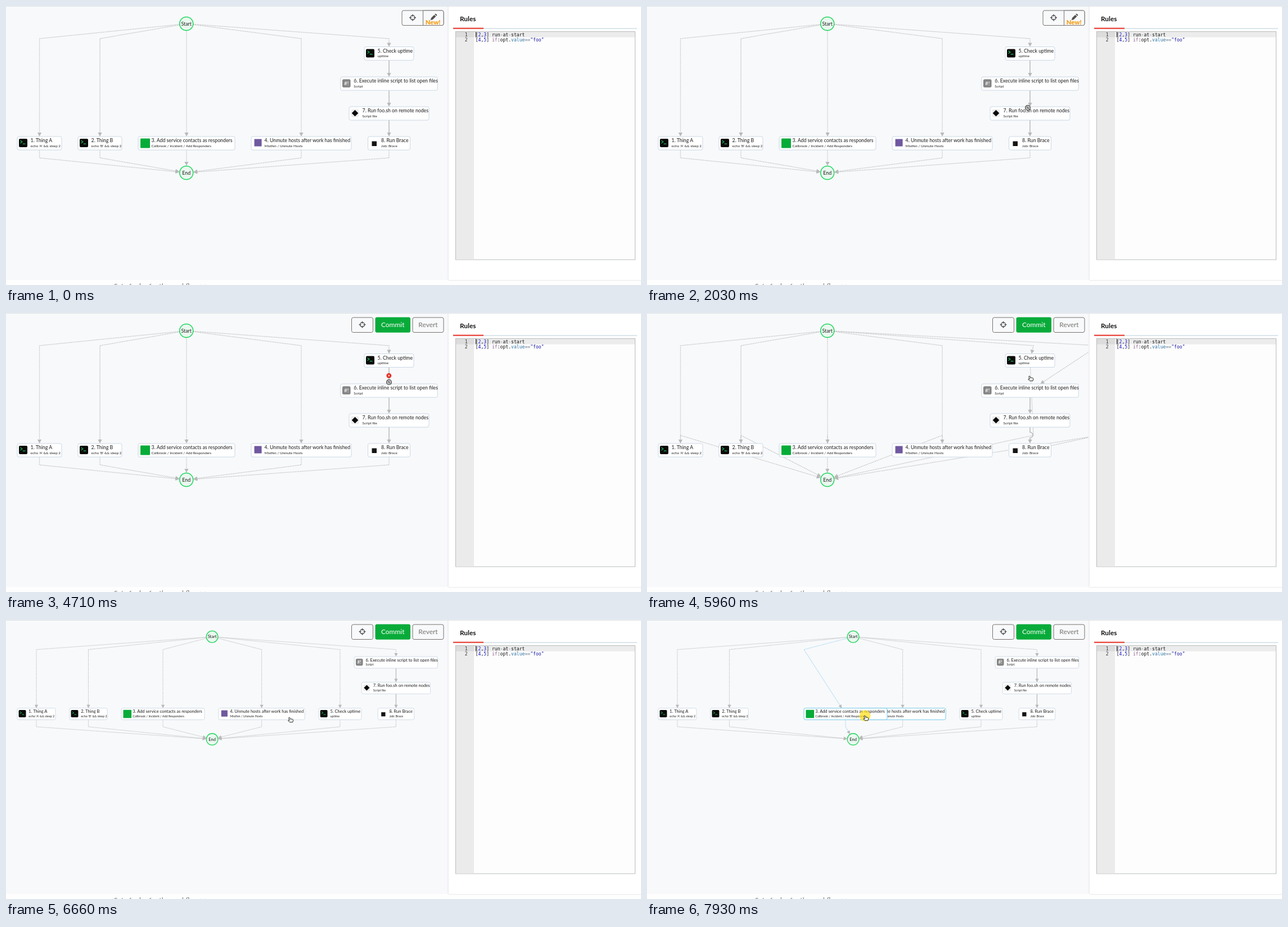
Animation, 1129 px wide and 496 px high, one loop 8000 ms. Source, as an HTML page:

```html
<!DOCTYPE html>
<html lang="en">
<head>
<meta charset="utf-8">
<title>Workflow graph</title>
<style>
html, body { margin: 0; width: 100%; height: 100%; overflow: hidden; background: #fefefe; }
svg { display: block; width: 1129px; height: 496px; font-family: Lato, "Open Sans", sans-serif; }
text { white-space: pre; }
.code { font: 8.1px "DejaVu Sans Mono", monospace; }
.title { font-size: 8.75px; fill: #1c1c1c; }
.sub { font-size: 6.35px; fill: #222; }
.node rect.box { fill: #fff; stroke: #cbd8e4; }
.node.on rect.box { stroke: #5fc3e6; }
.btn { fill: #f8f9fb; stroke: #77736f; }
.hot .btn { fill: #5f5b57; }
.ring { fill: #eaf8ef; stroke: #1fd65f; stroke-width: 1.5; }
</style>
</head>
<body>
<svg id="stage" viewBox="0 0 1129 496">
  <rect width="787" height="487" fill="#f8f9fb"/>
  <text x="192" y="502" font-size="12" fill="#777">Set of rules for the workflow &gt;&gt;</text>
  <g id="graph"><g id="edges"></g><g id="nodes"></g></g>
  <g id="remove"><circle cx="680.8" cy="111.3" r="4.4" fill="#e32b20"/><path d="M679.2 109.7l3.2 3.2m0-3.2l-3.2 3.2" stroke="#fff"/></g>

  <g id="viewBar">
    <rect class="btn" x="704" y="8" width="74" height="26.5" rx="3" style="fill:#f8f9fb"/>
    <use href="#aim" x="723" y="20.7"/>
    <g id="edit">
      <path class="btn" d="M741.5 8h33.5q3 0 3 3v20.5q0 3-3 3h-33.5z"/>
      <path id="pen" d="M-2.1-5.6v-1.2q0-1 1-1h2.2q1 0 1 1v1.2zm0 1.1h4.2v7.6l-2.1 4-2.1-4z" transform="translate(759.7 20.3) rotate(45)"/>
    </g>
    <text x="745.7" y="33" font-size="11.2" font-weight="900" fill="#f6a01e">New!</text>
  </g>
  <g id="editBar" font-size="12">
    <rect class="btn" x="614.5" y="8" width="38" height="26.5" rx="3"/>
    <use href="#aim" x="633.5" y="20.7"/>
    <rect x="656.5" y="7.5" width="62.5" height="27.3" rx="3" fill="#08ab3a"/>
    <text x="687.7" y="25.2" text-anchor="middle" fill="#fff">Commit</text>
    <g id="revert">
      <rect class="btn" x="723" y="8" width="55" height="26.5" rx="3"/>
      <text id="revertText" x="750.5" y="25.2" text-anchor="middle">Revert</text>
    </g>
  </g>

  <rect x="784.5" width="1.2" height="487" fill="#f3f4f6"/>
  <rect x="785.7" width="1.3" height="487" fill="#eceef0"/>
  <rect x="787" width="342" height="487" fill="#fff"/>
  <rect x="787" y="487" width="342" height="1.5" fill="#efefef"/>
  <rect width="1129" height="1" fill="#dfe2e4"/>
  <text x="807" y="27.3" font-size="11.8" font-weight="700" fill="#111">Rules</text>
  <rect x="849" y="39.3" width="273" height="1.6" fill="#d2e0e8"/>
  <rect x="795" y="38.6" width="54" height="2.3" fill="#e8463c"/>
  <rect x="799.5" y="45.5" width="319" height="405.5" fill="#fdfdfd" stroke="#b9bbbb"/>
  <rect x="800" y="46" width="32" height="404.5" fill="#ebebeb"/>
  <rect x="800" y="46" width="32" height="9.6" fill="#dcdcdc"/>
  <rect x="832" y="46" width="286" height="9.6" fill="#ececec"/>
  <rect x="834.9" y="46" width="1" height="9.6" fill="#333"/>
  <g class="code" fill="#111">
    <text x="820.5" y="53.6" text-anchor="end" fill="#333">1</text>
    <text x="820.5" y="63.4" text-anchor="end" fill="#333">2</text>
    <text x="834.7" y="53.6">[<tspan fill="#1414cd">2</tspan>,<tspan fill="#1414cd">3</tspan>] run<tspan fill="#687687">-</tspan>at<tspan fill="#687687">-</tspan>start</text>
    <text x="834.7" y="63.4">[<tspan fill="#1414cd">4</tspan>,<tspan fill="#1414cd">5</tspan>] <tspan fill="#93618f">if</tspan>:opt.<tspan fill="#2f76a8">value</tspan><tspan fill="#687687">==</tspan><tspan fill="#1a1aa6">"foo"</tspan></text>
  </g>

  <circle id="press" r="10" fill="#ffdf1a" opacity=".72"/>
  <g id="grab"><circle r="4.4" fill="#f2f2f2" stroke="#3d3d3d" stroke-width="1.3"/><circle r="2" fill="none" stroke="#555"/><path d="M-2.6-2.6L2.6 2.6" stroke="#444"/></g>
  <path id="hand" d="M-1.3.9Q-.2-1 1 .8L1.8 3.2Q4.4 2.6 6.2 3.7Q7.2 4.4 6.7 6L6 8.7H.8L-2 6.3Q-2.6 5 -1.2 5.1L.3 5.5Z" fill="#f4f4f4" stroke="#2c2c2c" stroke-linejoin="round"/>
  <defs><g id="aim" fill="none" stroke="#484848" stroke-width="1.2"><circle r="4"/><path d="M0-6v4M0 6v-4M-6 0h4M6 0h-4"/></g></defs>
</svg>
<script>
const $ = id => document.getElementById(id);
const LOOP = 8000, CUT = 5880, MOVE = 6110, ZOOM = .8605, H = 24;

const icons = {
  term: '<rect x="-7.5" y="-7.5" width="15" height="15" rx="2" fill="#0a0a0a"/><path d="M-5-4.3l3.4 2.4L-5 .5M-.8 1.6h4.6" fill="none" stroke="#1fc35a" stroke-width="1.1"/>',
  hash: '<rect x="-7.3" y="-7.3" width="14.6" height="14.6" rx="2.5" fill="#858585"/><text y="3.6" font-size="10" text-anchor="middle" fill="#fff">#!</text>',
  file: '<rect x="-7" y="-7" width="14" height="14" rx="3" fill="#ececec"/><path d="M0-5.8L5.8 0 0 5.8-5.8 0z" fill="#080808"/>',
  green: '<rect x="-6.5" y="-8" width="17" height="17" rx="1" fill="#06ac38"/>',
  purple: '<rect x="-5" y="-7" width="13" height="13" fill="#6f589f"/>',
  dark: '<rect x="-3.5" y="-3" width="8.5" height="8.5" fill="#141414"/>'
};

// width, first place, second place, icon, title, subtitle
const nodes = {
  1: [79, 59.5, 244, 59.5, 191, 'term', '1. Thing A', "echo 'A' && sleep 2"],
  2: [78, 167, 244, 167, 191, 'term', '2. Thing B', "echo 'B' && sleep 2"],
  3: [172, 321, 244, 321, 191, 'green', '3. Add service contacts as responders', 'Callbrook / Incident / Add Responders'],
  4: [178, 525, 244, 525, 191, 'purple', '4. Unmute hosts after work has finished', 'Mistfen / Unmute Hosts'],
  5: [88, 681, 84.5, 687, 191, 'term', '5. Check uptime', 'uptime'],
  6: [172.5, 681, 138, 802.6, 84.5, 'hash', '6. Execute inline script to list open files', 'Script'],
  7: [142, 681, 191, 802.6, 137.5, 'file', '7. Run foo.sh on remote nodes', 'Script file'],
  8: [75, 681, 244, 802.6, 191, 'dark', '8. Run Brace', 'Job: Brace'],
  S: [0, 320.7, 31.5, 422.7, 31.5, '', 'Start'],
  E: [0, 320.7, 296.5, 422.7, 243.4, '', 'End']
};
const esc = s => s.replace(/&/g, '&amp;');
const els = {};
for (const [id, [w, , , , , icon, title, sub]] of Object.entries(nodes)) {
  const g = document.createElementNS('http://www.w3.org/2000/svg', 'g');
  g.setAttribute('class', 'node');
  g.innerHTML = w
    ? `<rect class="box" x="${-w / 2}" y="${-H / 2}" width="${w}" height="${H}" rx="3"/>
       <g transform="translate(${10.5 - w / 2} -.5)">${icons[icon]}</g>
       <text class="title" x="${23.6 - w / 2}" y="-2">${title}</text>
       <text class="sub" x="${23.6 - w / 2}" y="6.7">${esc(sub)}</text>`
    : `<circle class="ring" r="12"/><text class="title" y="3" text-anchor="middle">${title}</text>`;
  $('nodes').append(g);
  els[id] = g;
}
$('nodes').append(els[3]); // the dragged node stays on top

const shared = 'S1 S2 S3 S4 S5 67 78 1E 2E 3E 4E 8E';
const before = (shared + ' 56').split(' ');
const after = (shared + ' S6 5E').split(' ').filter(name => name !== '');

// runs of changes: start, end, steps
const runs = [[200, 910, 10], [1150, 1950, 11], [2030, 2830, 11], [2910, 3140, 4], [3610, 3610, 1],
  [3760, 3920, 3], [4310, 4870, 8], [5020, 5180, 3], [5720, 5720, 1], [5880, 5960, 2],
  [6110, 6900, 11], [6980, 7140, 3], [7290, 7930, 9]];
function hold(t) {
  const run = runs.filter(r => r[0] <= t).pop();
  if (!run) return 0;
  const [a, b, n] = run;
  if (n < 2) return a;
  const d = (b - a) / (n - 1);
  return a + d * Math.min(n - 1, Math.floor((t - a + 5) / d));
}

// pointer path: time, x, y
const path = [[200, 783, 419], [450, 722, 338], [700, 639, 265], [910, 676, 246], [1150, 683, 244],
  [1600, 666, 212], [1950, 676, 188], [2030, 677, 181], [2300, 674, 150], [2600, 697, 90],
  [2830, 731, 49], [2910, 733, 47], [3140, 756, 19], [4230, 756, 19], [4390, 735, 44],
  [4630, 684, 116], [4710, 681, 123], [4870, 682, 119], [5020, 681, 116], [5180, 680, 112],
  [6030, 680, 112], [6380, 612, 148], [6660, 506, 173], [6900, 327, 171], [7140, 313, 172],
  [7290, 313, 172], [7930, 387, 170]];
function pointer(t) {
  const i = path.findIndex(p => p[0] > t);
  if (i < 0) return path[path.length - 1].slice(1);
  const [a, b] = [path[i - 1] || path[0], path[i]];
  const k = b[0] > a[0] ? (t - a[0]) / (b[0] - a[0]) : 0;
  return [a[1] + (b[1] - a[1]) * k, a[2] + (b[2] - a[2]) * k];
}

// where the ray from a node's centre to a point leaves its outline
function border(id, [cx, cy], [x, y]) {
  const dx = x - cx, dy = y - cy, w = nodes[id][0];
  const k = w ? Math.min(w / 2 / Math.abs(dx || 1e-9), H / 2 / Math.abs(dy || 1e-9)) : 12.5 / Math.hypot(dx, dy);
  return [cx + dx * k, cy + dy * k];
}

function edge(name, pos, bend, color, jump) {
  const [a, b] = name;
  const dotted = a === 'S' || b === 'E';
  const start = border(a, pos[a], bend || pos[b]);
  const end = border(b, pos[b], bend || pos[a]);
  const from = bend || start;
  const ang = Math.atan2(end[1] - from[1], end[0] - from[0]);
  const at = (back, side) => [end[0] - back * Math.cos(ang) - side * Math.sin(ang),
    end[1] - back * Math.sin(ang) + side * Math.cos(ang)].map(v => v.toFixed(2));
  const mid = bend ? 'L' + bend : jump ? 'V212a5 5 0 0 1 0 10' : '';
  return `<path d="M${start}${mid}L${at(6, 0)}" fill="none" stroke="${color}" stroke-width="${dotted ? 1.25 : 1.5}"${dotted ? ' stroke-dasharray="1.6 1.4"' : ''}/>
    <path d="M${at(0, 0)}L${at(7, 3.6)}L${at(7, -3.6)}z" fill="#b9b9b9"/>`;
}

function drawGraph(t, drag) {
  const raw = t < MOVE ? 0 : Math.min(1, (t - MOVE + 80) / 480);
  const p = raw * raw * (3 - 2 * raw);
  const z = 1 + (ZOOM - 1) * p;
  const cut = t >= CUT;
  const pos = {};
  for (const id in nodes) {
    const [, ax, ay, bx, by] = nodes[id];
    pos[id] = [ax + (bx - ax) * p, ay + (by - ay) * p];
    if (id === '3') pos[id][0] += drag / ZOOM;
    els[id].setAttribute('transform', `translate(${pos[id]})`);
  }
  $('graph').setAttribute('transform', `translate(20 19) scale(${z}) translate(-20 -19)`);
  els[3].classList.toggle('on', drag > 0);
  els[4].classList.toggle('on', drag > 25);
  $('edges').innerHTML = (cut ? after : before).map(name => {
    const [a, b] = name;
    const slot = id => nodes[id][cut ? 3 : 1];
    const bend = a === 'S' ? [slot(b), 58]
      : b === 'E' ? [slot(a) + (a === '3' ? drag / ZOOM : 0), cut ? 217.5 : 270] : null;
    const lit = drag > 0 && name.includes('3');
    return edge(name, pos, bend, lit ? '#8fd0ec' : '#b9b9b9', name === '78' && cut && t < MOVE);
  }).join('');
}

const show = (id, on) => $(id).style.display = on ? '' : 'none';
const within = (t, a, b) => t >= a && t < b;

function draw(now) {
  const t = hold(now);
  const [x, y] = pointer(t);
  const editing = t >= 3760;
  const overBar = y < 35 && x > 723;
  const overNode = editing && x > 637 && x < 725 && y > 72 && y < 97;
  const hand = overBar || overNode || t >= 5100;

  drawGraph(t, t >= 7290 ? x - 313 : 0);
  show('viewBar', !editing);
  show('editBar', editing);
  $('edit').classList.toggle('hot', overBar && x > 741);
  $('pen').setAttribute('fill', overBar && x > 741 ? '#fff' : '#55514e');
  $('revert').classList.toggle('hot', overBar);
  $('revertText').setAttribute('fill', overBar ? '#fff' : '#77736f');
  show('remove', within(t, 4630, CUT));
  show('press', within(t, 3610, 3760) || within(t, 5720, CUT) || t >= 7290);
  show('grab', t >= 200 && !hand);
  show('hand', t >= 200 && hand);
  $('press').setAttribute('transform', `translate(${x + .5} ${y + .3})`);
  $('grab').setAttribute('transform', `translate(${x} ${y})`);
  $('hand').setAttribute('transform', `translate(${x} ${y})`);
}

const begin = performance.now();
function tick() {
  draw((performance.now() - begin) % LOOP);
  requestAnimationFrame(tick);
}
tick();
</script>
</body>
</html>
```
